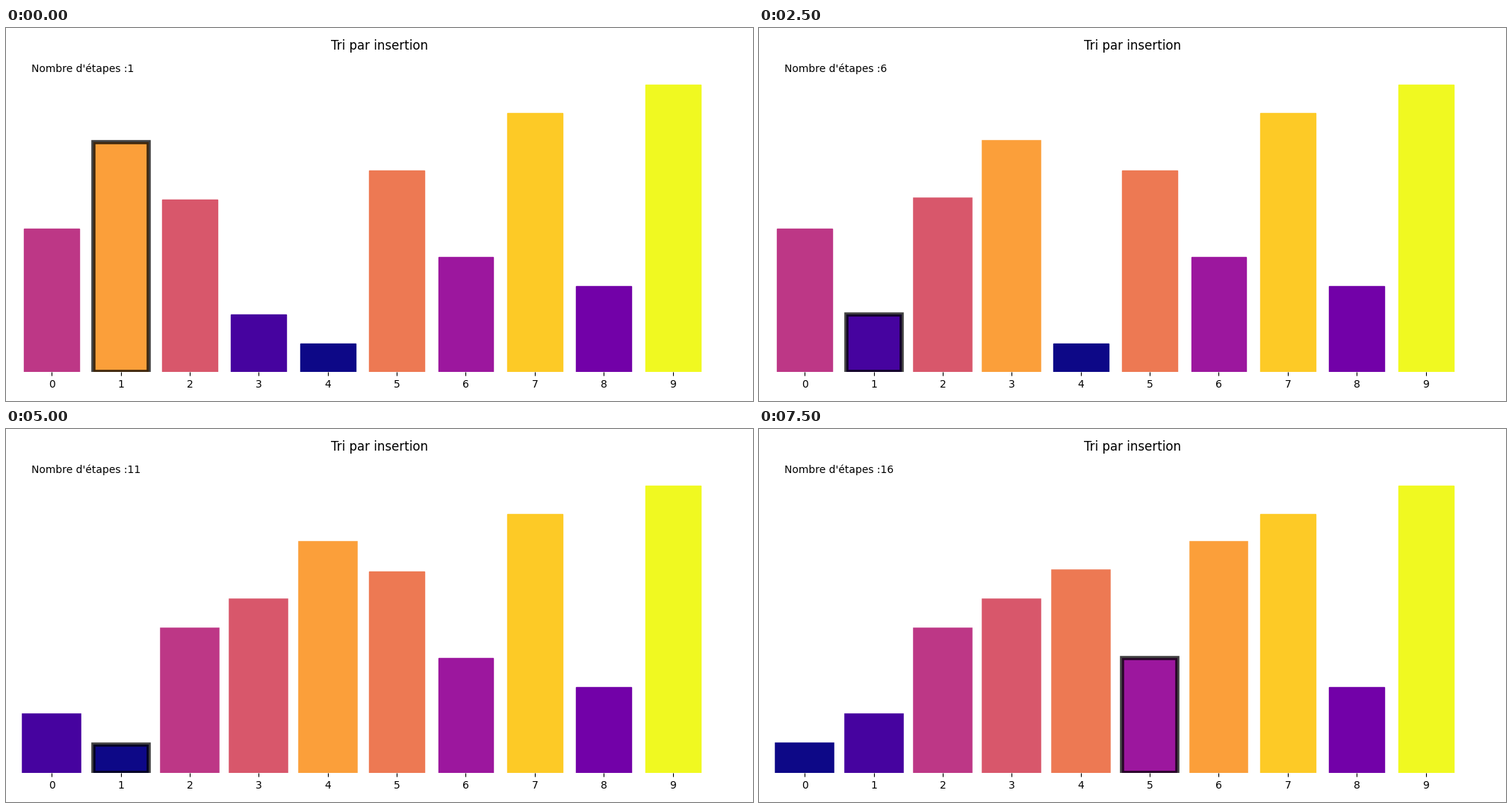
Recreate the animation shown at these times as a matplotlib script. Size 1000 by 500 pixels, loop 8000 ms.

```python
import matplotlib.pyplot as plt
from matplotlib.animation import FuncAnimation

START = [5, 8, 6, 2, 1, 7, 4, 9, 3, 10]
STEPS = 16
SHADE = (0, 0, 0, 0.75)


def insertion_steps(values):
    """Return (values, active position, positions visited) for every step."""
    vals, seen, steps = list(values), set(), []

    def record(pos):
        seen.add(pos)
        steps.append((list(vals), pos, set(seen)))

    for i in range(1, len(vals)):
        j = i
        record(j)
        while j > 0 and vals[j - 1] > vals[j]:
            vals[j - 1], vals[j] = vals[j], vals[j - 1]
            j -= 1
            record(j)
    return steps


def color(value):
    return plt.cm.plasma((value - 1) / (len(START) - 1))


plt.rcParams["font.family"] = "DejaVu Sans"
fig, ax = plt.subplots(figsize=(10, 5), dpi=100)
bars = ax.bar(range(len(START)), START, width=0.8)
ax.set_title("Tri par insertion", fontsize=12)
ax.set_xlim(-0.5, 10)
ax.set_ylim(0, 11)
ax.set_xticks(range(len(START)))
ax.yaxis.set_visible(False)
for spine in ax.spines.values():
    spine.set_visible(False)
counter = ax.text(0.02, 0.95, "", transform=ax.transAxes, fontsize=10)
fig.tight_layout()

steps = insertion_steps(START)[:STEPS]


def draw(n):
    vals, active, seen = steps[n]
    for pos, (bar, value) in enumerate(zip(bars, vals)):
        bar.set_height(value)
        bar.set_facecolor(color(value))
        bar.set_edgecolor(SHADE if pos == active else color(value))
        bar.set_linewidth(4 if pos in seen else 1)
    counter.set_text(f"Nombre d'étapes :{n + 1}")
    return [*bars, counter]


anim = FuncAnimation(fig, draw, frames=STEPS, init_func=lambda: draw(0),
                     interval=500, repeat=True, repeat_delay=0)
plt.show()
```
